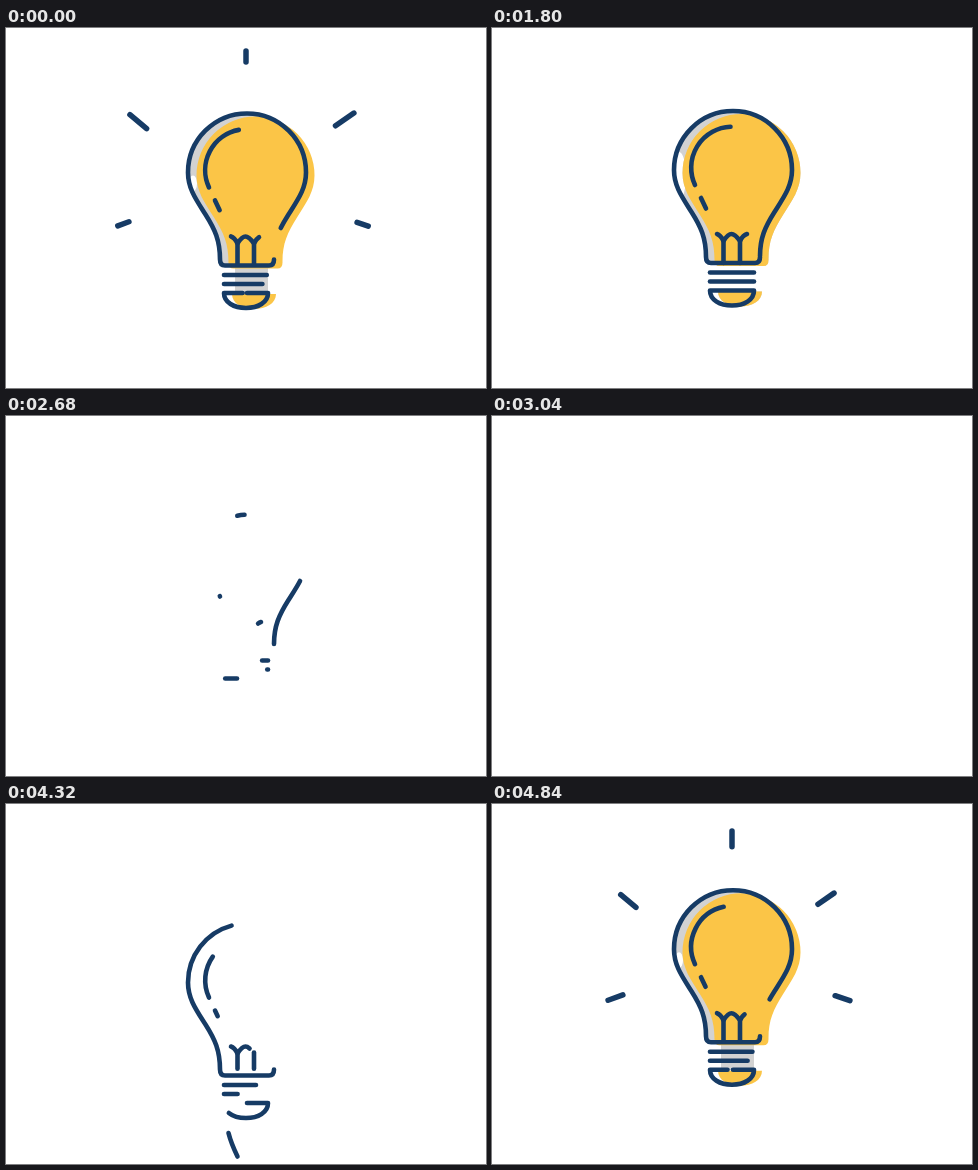
An HTML page with a canvas that plays this animation: 480x360 px, repeating every 4.88 s.

```html
<!DOCTYPE html>
<html lang="en">
<head>
<meta charset="utf-8">
<title>Light bulb</title>
<style>
  html, body { margin: 0; width: 100%; height: 100%; overflow: hidden; background: #fff; }
  canvas { display: block; }
</style>
</head>
<body>
<canvas id="stage" width="480" height="360"></canvas>
<script>
const ctx = document.getElementById('stage').getContext('2d');
const NAVY = '#163b65', YELLOW = '#fbc547', GREY = '#d2d2d2';
const LOOP = 4880, DRAW = 3920, DRAW_END = 5400, WIPE = 1800, ERASE = 2280, BLANK = 3040;

const clamp = (v, lo = 0, hi = 1) => Math.min(hi, Math.max(lo, v));
const smooth = u => u * u * (3 - 2 * u);

function line(d, drawLead = 0, eraseLead = 0) {
  const box = document.createElement('div');
  box.innerHTML = `<svg><path d="${d}"/></svg>`;
  const length = box.querySelector('path').getTotalLength();
  return { path: new Path2D(d), length, drawLead, eraseLead };
}

const BULB = 'M268 229Q268 235 263 235H219Q214 235 214 229C214 210 209 199 199.5 184' +
  'C190 169 182 158 182 142A59 59 0 0 1 300 142C300 158 292 169 282.5 184C273 199 268 210 268 228';
const cap = x => `M${x} 262.5H262C262 272 252 277.5 240 277.5C228 277.5 218 272 218 262.5H${x}`;

const bulb = line(BULB, 0, 10);
const capDrawn = line(cap(241), 100), capErased = line(cap(231), 0, 60);
const details = [
  line('M203 157A41 41 0 0 1 238.5 98.8', 0, 90),
  line('M209 170L214 180.5', 0, 200),
  line('M225 206Q228.5 207 231.5 213Q236 206 239.5 206Q243 206 248 213Q251 207 255 206', 40, 100),
  line('M231.5 212V235', 150, 320),
  line('M248 212V235', 150, 320),
  line('M218 244.5H262', 180, 40),
  line('M218 253.5H262', -130, 250)
];
const trail = line('M231.5 352.5Q225 339 222.5 329');

// Each ray: start, end, head position and speed, tail position and speed.
const rays = [
  [240, 47, 240, 22, .8, .16, .16, .34],
  [147, 106, 110, 75, .49, .13, .08, .08],
  [322, 103, 361, 76, .51, .15, .1, .08],
  [136, 189, 103, 201, .6, .13, .15, .23],
  [338, 190, 371, 201, .6, .13, .15, .23]
];

// Quick start with a long settling tail.
function trimEase(u) {
  u = clamp(u);
  if (u < .351) {
    const v = u / .351;
    return .68 * v * v * (2.4 - 1.4 * v);
  }
  return 1 - .26 * Math.pow((1 - u) / .595, 2.36);
}

function trim({ path, length }, from, to) {
  if (to - from < .004) return;
  ctx.setLineDash([(to - from) * length, length * 2]);
  ctx.lineDashOffset = -from * length;
  ctx.stroke(path);
  ctx.setLineDash([]);
}

function clipBelowDiagonal(sum) {
  ctx.beginPath();
  ctx.moveTo(sum, 0);
  ctx.lineTo(1000, 0);
  ctx.lineTo(1000, 1000);
  ctx.lineTo(sum - 1000, 1000);
  ctx.clip();
}

function shiftedFill(color) {
  ctx.save();
  ctx.fillStyle = color;
  ctx.translate(8.5, 3);
  ctx.fill(bulb.path);
  ctx.translate(-.5, -2);
  ctx.fill(capDrawn.path);
  ctx.restore();
}

// Grey backing of the glass and neck; wear eats it away as the bulb settles.
function shade(wear, withNeck) {
  ctx.fillStyle = GREY;
  ctx.fill(bulb.path);
  if (withNeck) {
    ctx.beginPath();
    ctx.moveTo(229 + 33 * wear, 236);
    ctx.lineTo(262, 236);
    ctx.lineTo(262, 263);
    ctx.lineTo(229 + 16 * wear, 263);
    ctx.fill();
  }
  ctx.fillStyle = '#fff';
  ctx.beginPath();
  ctx.ellipse(187, 153 - 5 * wear, 4 + 3 * wear, 8 + 16 * wear, 0, 0, 7);
  ctx.fill();
}

function fills(time, lift) {
  const wipe = clamp((time - WIPE) / 540);
  if (time < DRAW && wipe >= 1) return;
  if (time >= DRAW && time < 4450) return;
  ctx.save();
  if (time >= DRAW) {
    const grow = (time - 4440) / 80;
    if (grow < 2.2) {
      ctx.beginPath();
      ctx.roundRect(193, 90, 111 * Math.max(1, grow) * clamp(grow), 20 + 96 * grow, [0, 0, 32, 0]);
      ctx.clip();
    }
    ctx.translate(0, lift);
    shade(clamp((time - LOOP) / 520), time > 4660);
    shiftedFill(YELLOW);
    if (grow < 2) {
      const inside = new Path2D();
      inside.addPath(bulb.path, { e: 8.5, f: 3 });
      ctx.clip(inside);
      ctx.strokeStyle = GREY;
      ctx.lineWidth = 12 * clamp(2 - grow);
      ctx.beginPath();
      ctx.moveTo(285, 90);
      ctx.lineTo(195, 178);
      ctx.stroke();
    }
  } else {
    const edge = 280 + 275 * smooth(wipe);
    clipBelowDiagonal(edge);
    shade(1, time < WIPE);
    if (wipe > 0) shiftedFill(GREY);
    clipBelowDiagonal(edge + 16 * clamp(wipe * 8));
    shiftedFill(YELLOW);
  }
  ctx.restore();
}

function strokes(time, lift) {
  const drawing = time >= DRAW;
  if (!drawing && time >= BLANK) return;
  ctx.save();
  ctx.translate(0, lift);
  for (const part of [bulb, ...details, drawing ? capDrawn : capErased]) {
    if (drawing) {
      const lead = time < DRAW + 10 ? 0 : part.drawLead;
      trim(part, 0, trimEase((time - DRAW + lead) / (DRAW_END - DRAW)));
    } else {
      trim(part, trimEase((time - ERASE + part.eraseLead) / 800), 1);
    }
  }
  ctx.restore();
}

function drawTrail(time) {
  if (time < DRAW || time > 4600) return;
  ctx.globalAlpha = clamp(.5 + (time - DRAW) / 160);
  trim(trail, clamp((time - 4440) / 160), clamp(.01 + (time - DRAW) / 400));
  ctx.globalAlpha = 1;
}

function drawRays(time) {
  const k = (time - 4840) / 40;
  if (k < -6 || k > 12) return;
  ctx.lineWidth = 5.5;
  for (const [x0, y0, x1, y1, head, headRate, tail, tailRate] of rays) {
    const a = clamp(tail + tailRate * k + (k > 0 ? .01 * k * k : 0));
    const b = clamp(head + headRate * k);
    if (b - a < .02) continue;
    ctx.beginPath();
    ctx.moveTo(x0 + (x1 - x0) * a, y0 + (y1 - y0) * a);
    ctx.lineTo(x0 + (x1 - x0) * b, y0 + (y1 - y0) * b);
    ctx.stroke();
  }
}

function render(now) {
  const t = now % LOOP;
  const time = t < 520 ? t + LOOP : t;
  const lift = time >= DRAW ? 17.2 * Math.pow((DRAW_END - time) / 880, 3.7) : 0;
  ctx.fillStyle = '#fff';
  ctx.fillRect(0, 0, 480, 360);
  fills(time, lift);
  ctx.strokeStyle = NAVY;
  ctx.lineWidth = 4.6;
  ctx.lineCap = ctx.lineJoin = 'round';
  strokes(time, lift);
  drawTrail(time);
  drawRays(time);
}

const start = performance.now();
function tick() {
  render(performance.now() - start);
  requestAnimationFrame(tick);
}
tick();
</script>
</body>
</html>
```
